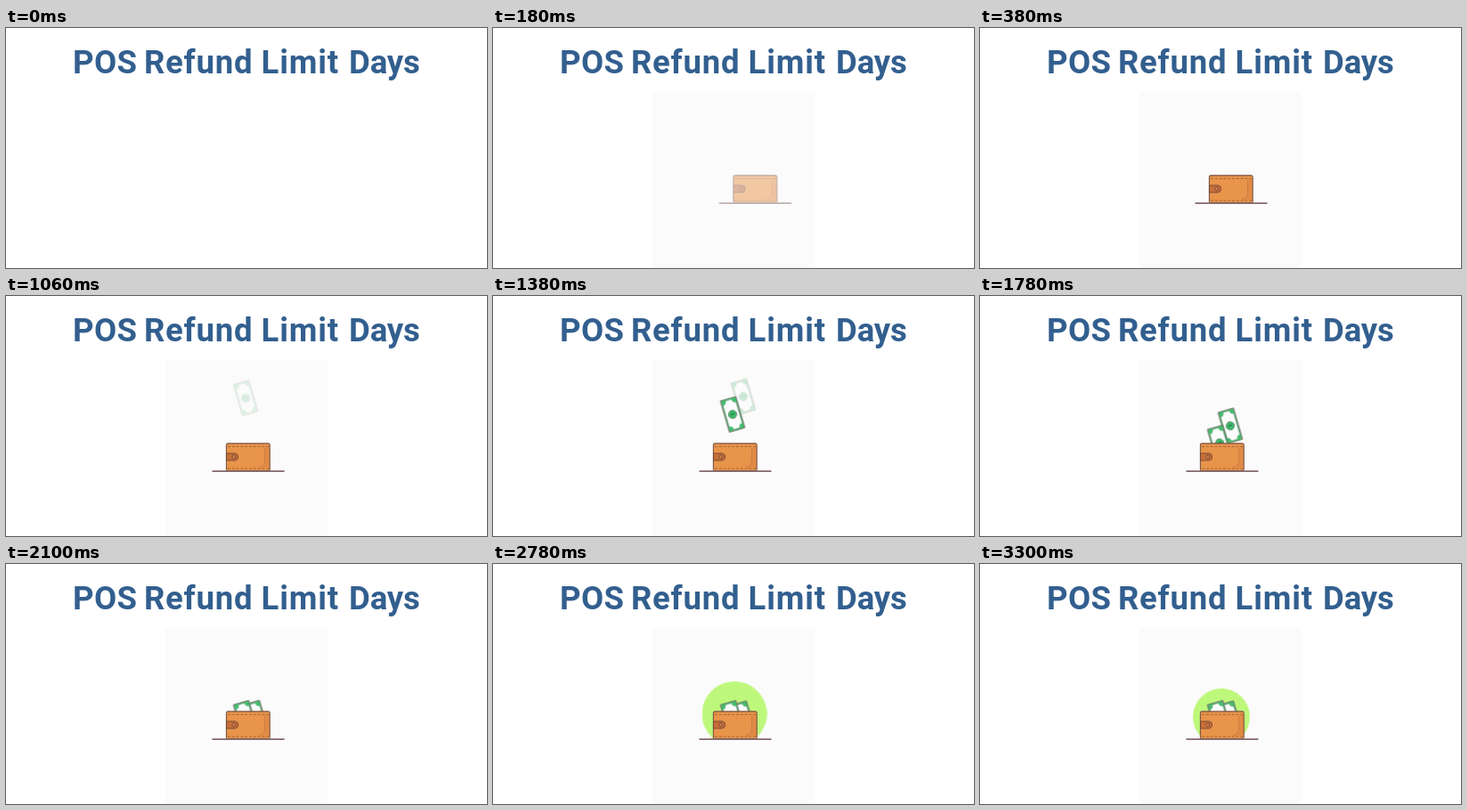
Write an HTML page that moves like this. It is 540 by 270 pixels and loops after 3.58 s.

```html
<!DOCTYPE html>
<html lang="en">
<head>
<meta charset="utf-8">
<title>POS Refund Limit Days</title>
<style>
  html, body { margin: 0; width: 100%; height: 100%; overflow: hidden; background: #fff; }
  svg { display: block; width: 100%; height: 100%; }
  .title { font: 700 36.5px Roboto, sans-serif; fill: #325f8f; }

  .panel, .wallet, .bill, .glow {
    animation-duration: 3580ms;
    animation-timing-function: linear;
    animation-iteration-count: infinite;
  }
  .panel { animation-name: show; }
  .wallet { animation-name: slide, wallet-fade; }
  .front { animation-name: front-drop, front-fade; }
  .back { animation-name: back-drop, back-fade; }
  .glow { animation-name: pop; transform-origin: 271px 197px; }

  @keyframes show {
    0% { opacity: 0; animation-timing-function: step-end; }
    2.793%, 100% { opacity: 1; }
  }
  @keyframes slide {
    0% { transform: translateX(30px); }
    2.793% { transform: translateX(30px); animation-timing-function: steps(12, start); }
    16.2%, 100% { transform: none; }
  }
  @keyframes wallet-fade {
    0% { opacity: 0; }
    2.793% { opacity: 0; animation-timing-function: steps(6, start); }
    9.5%, 100% { opacity: 1; }
  }
  @keyframes front-drop {
    0%, 26.76% { transform: translateY(-60px); animation-timing-function: cubic-bezier(.37, 0, .63, 1); }
    57.12%, 100% { transform: none; }
  }
  @keyframes front-fade {
    0%, 28.5% { opacity: 0; }
    35.2%, 100% { opacity: 1; }
  }
  @keyframes back-drop {
    0%, 37.6% { transform: translateY(-61px); animation-timing-function: cubic-bezier(.65, 0, .35, 1); }
    61.2%, 100% { transform: none; }
  }
  @keyframes back-fade {
    0%, 37.15% { opacity: 0; }
    42.74%, 100% { opacity: 1; }
  }
  @keyframes pop {
    0%, 69.83% { transform: scale(0); animation-timing-function: cubic-bezier(.15, .7, .4, 1); }
    77.65% { transform: scale(1.14); animation-timing-function: ease-in-out; }
    84.36% { transform: scale(.985); animation-timing-function: ease-in-out; }
    92.18%, 100% { transform: scale(1); }
  }
</style>
</head>
<body>
<svg viewBox="0 0 540 270">
  <defs>
    <clipPath id="above"><rect x="178" y="72" width="183" height="125"/></clipPath>
    <g id="note">
      <rect x="-9" y="-18.2" width="18" height="36.4" rx=".5" fill="#3fc06c" stroke="#7b716c" stroke-width="1.1"/>
      <path d="M-3.4 -16.6H3.4Q3.6 -12.6 7.4 -12.2V12.2Q3.6 12.6 3.4 16.6H-3.4Q-3.6 12.6 -7.4 12.2V-12.2Q-3.6 -12.6 -3.4 -16.6Z" fill="#fdfdfd" stroke="#8fa596" stroke-width=".5"/>
      <circle r="4.6" fill="#3bbd68" stroke="#5f7f69" stroke-width=".9"/>
      <path d="M-2.2 .8Q0 -2 2.2 .2" fill="none" stroke="#2d6b48" stroke-width="1.2"/>
    </g>
  </defs>

  <text class="title" y="50.5">
    <tspan x="75" letter-spacing=".4">POS</tspan>
    <tspan x="155" letter-spacing=".8">Refund</tspan>
    <tspan x="286.5" letter-spacing=".9">Limit</tspan>
    <tspan x="385" letter-spacing="-.1">Days</tspan>
  </text>

  <rect class="panel" x="178.5" y="72" width="182.5" height="198" fill="#fbfbfb"/>

  <g clip-path="url(#above)">
    <circle class="glow" cx="271" cy="172" r="32" fill="#bdf87b"/>
    <g class="bill back"><use href="#note" transform="translate(281 174) rotate(-16.3)"/></g>
    <g class="bill front"><use href="#note" transform="translate(269 173.5) rotate(-16.3)"/></g>
  </g>

  <g class="wallet">
    <rect x="247.4" y="165.9" width="48.8" height="31" rx="1.8" fill="#e8944a"/>
    <path d="M290.5 170.5V186Q290 192 284 193H295.4V170.5Z" fill="#e08a46"/>
    <path d="M290.5 171V186Q290 192 284 192.6" fill="none" stroke="#c67c42" stroke-width=".8"/>
    <path d="M249 169.4H295M249 194.2H295" stroke="#9c6138" stroke-width=".9" stroke-dasharray="3 1.8"/>
    <rect x="247.4" y="165.9" width="48.8" height="31" rx="1.8" fill="none" stroke="#7a5244" stroke-width="1.1"/>
    <path d="M247.5 177H257.2Q260.6 177.4 260.6 181T257.2 185H247.5Z" fill="#c66f38" stroke="#704334" stroke-width=".9"/>
    <circle cx="255.8" cy="181" r="2" fill="#d08049" stroke="#704334" stroke-width=".8"/>
    <path d="M231.5 197.1H312.5" stroke="#83686a" stroke-width="1.7"/>
  </g>
</svg>
</body>
</html>
```
